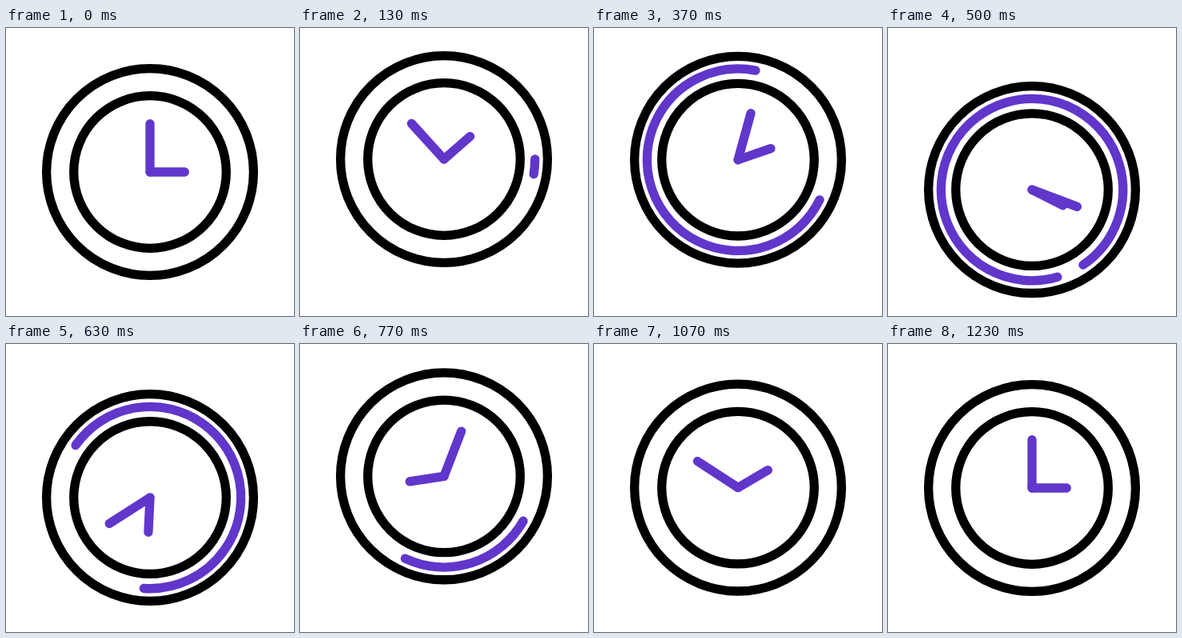
These frames come from a looping animation (360x360 px, 1670 ms). An HTML page:

```html
<!DOCTYPE html>
<html lang="en">
<head>
<meta charset="utf-8">
<title>Clock</title>
<style>
  html, body { margin: 0; width: 100%; height: 100%; overflow: hidden; background: #fff; }
  svg { display: block; width: 100vw; height: 100vh; }
  g { fill: none; stroke: #000; stroke-width: 11.3; stroke-linecap: round; }
  .accent { stroke: #6136cb; }
</style>
</head>
<body>
<svg viewBox="0 0 360 360">
  <g id="clock">
    <circle r="129.4"/>
    <circle r="95.3"/>
    <circle id="arc" class="accent" r="113.7" pathLength="360"/>
    <path id="minute" class="accent" d="M0 0V-60.3"/>
    <path id="hour" class="accent" d="M0 0V-43.3"/>
  </g>
</svg>
<script>
const LOOP = 1670, STEP = 100 / 3;
const [clock, arc, minute, hour] =
  ['clock', 'arc', 'minute', 'hour'].map(id => document.getElementById(id));

// Cubic bezier easing with handles (a, 0) and (b, 1).
function ease(x, a = 0.4, b = 0.6) {
  if (x <= 0) return 0;
  if (x >= 1) return 1;
  let lo = 0, hi = 1;
  for (let i = 0; i < 24; i++) {
    const s = (lo + hi) / 2, r = 1 - s;
    if (3 * r * r * s * a + 3 * r * s * s * b + s * s * s < x) lo = s;
    else hi = s;
  }
  return lo * lo * (3 - 2 * lo);
}

// Keys are [step, value, a, b]; the handles shape the move into that key.
function track(keys, k) {
  let i = 1;
  while (i < keys.length - 1 && k > keys[i][0]) i++;
  const [k0, v0] = keys[i - 1], [k1, v1, a, b] = keys[i];
  return v0 + (v1 - v0) * ease((k - k0) / (k1 - k0), a, b);
}

const bounce = [[0, 180], [8, 148], [16, 204], [24, 164], [33, 180]];
const minuteTurn = [[0, 0], [4.8, -45], [37, 720, 0.385, 0.69]];
const hourTurn = [[0, 90], [5, 45], [37, 450, 0.43, 0.68]];
const arcTurn = [[4, 90], [26, 210]];
const arcHead = [[2.5, 0], [16, 360]];
const arcTail = [[13, 0], [28, 360]];

function draw(t) {
  const k = Math.floor((t % LOOP + 5) / STEP);
  const turn = (el, deg) => el.setAttribute('transform', `rotate(${deg})`);
  const tail = track(arcTail, k);
  const length = track(arcHead, k) - tail;

  clock.setAttribute('transform', `translate(180 ${track(bounce, k)})`);
  turn(minute, track(minuteTurn, k));
  turn(hour, track(hourTurn, k));
  turn(arc, track(arcTurn, k) + tail - 90);
  arc.setAttribute('stroke-dasharray', `${length} 720`);
  arc.setAttribute('visibility', length > 0.01 ? 'visible' : 'hidden');
}

const start = performance.now();
function tick() {
  draw(performance.now() - start);
  requestAnimationFrame(tick);
}
tick();
</script>
</body>
</html>
```
